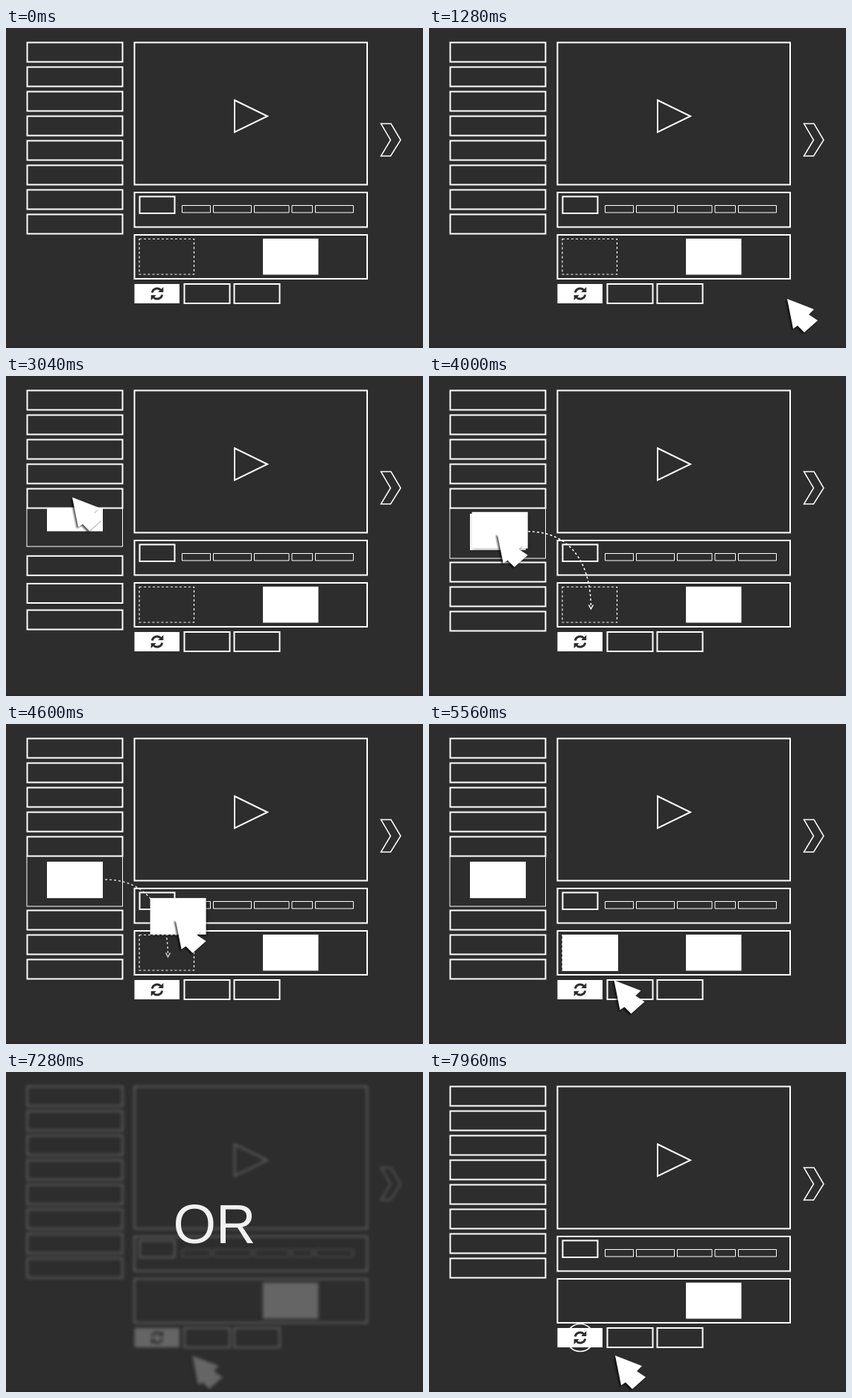
Write an HTML page that moves like this. It is 560 px wide and 430 px high and loops after 8 s.

```html
<!DOCTYPE html>
<html lang="en">
<head>
<meta charset="utf-8">
<title>Drag and drop wireframe</title>
<style>
  html, body { margin: 0; height: 100%; overflow: hidden; background: #2d2d2d; }
  svg { display: block; width: 560px; height: 430px; }
  .line { fill: none; stroke: #fff; stroke-width: 2; }
  .thin { fill: none; stroke: #fff; stroke-width: 1; }
  .dash { stroke-width: 1.2; stroke-dasharray: 3 3; }
  .solid { fill: #fff; }
  #cursor { filter: drop-shadow(-2px 2.5px 1px rgba(0, 0, 0, .65)); }
  #or { font: 74px "Liberation Sans", Arial, sans-serif; fill: #fff; text-anchor: middle; }
</style>
</head>
<body>
<svg viewBox="0 0 560 430">
  <defs>
    <clipPath id="reveal"><rect id="revealBox" x="28" y="178" width="129" height="0"/></clipPath>
  </defs>
  <rect width="560" height="430" fill="#2d2d2d"/>
  <rect y="427" width="560" height="3" fill="#2a2829"/>

  <g id="scene">
    <g id="menu"></g>
    <rect id="panel" class="thin" x="28" y="177.5" width="128.5" height="0"/>
    <g clip-path="url(#reveal)"><rect id="tile" class="solid" x="55" y="185" width="75" height="49"/></g>

    <rect class="line" x="172.5" y="19.5" width="312.5" height="191"/>
    <path class="line" d="M307 97L351 118.5L307 140Z"/>
    <path class="line" style="stroke-width:1.5" d="M503.5 128.5H517L530 150.5L516.5 172H503.5L516.5 150.5Z"/>

    <rect class="line" x="172.5" y="221" width="312.5" height="46.5"/>
    <rect class="line" x="179.5" y="226.5" width="47" height="22.5"/>
    <path class="thin" d="M236.5 238.5h38v9.5h-38zM278.5 238.5h51v9.5h-51zM333.5 238.5h46.5v9.5h-46.5zM384 238.5h27.5v9.5h-27.5zM415.5 238.5h51v9.5h-51z"/>

    <rect class="line" x="172.5" y="278" width="312.5" height="59"/>
    <rect id="slot" class="thin dash" x="179" y="283.5" width="73.5" height="47.5"/>
    <rect class="solid" x="345" y="283" width="74.5" height="48.5"/>

    <rect class="solid" x="172.5" y="344" width="60.5" height="26"/>
    <rect class="line" x="239.5" y="344" width="61" height="26"/>
    <rect class="line" x="306.5" y="344" width="61" height="26"/>
    <g id="icon" transform="translate(203 357)"></g>
    <circle id="ring" class="line" style="stroke-width:1.6" cx="203" cy="357" r="13"/>

    <g id="arrow">
      <path class="thin dash" style="stroke-width:1.5" d="M133 209C185 209 217 245 217.5 311"/>
      <path class="thin" style="stroke-width:1.5" d="M214.5 307.5L217.5 313L220.5 307.5"/>
    </g>
    <g id="drag"><rect class="solid" x="-37.5" y="-24.5" width="75" height="49"/></g>
    <g id="cursor"><path id="pointer" class="solid" d="M0 0L36 14L29 21L41 29L23 45L14 36L8 40Z"/></g>
  </g>
  <text id="or" x="280" y="229.5">OR</text>
</svg>
<script>
const LOOP = 8000;
const $ = id => document.getElementById(id);
const set = (id, attrs) => { for (const k in attrs) $(id).setAttribute(k, attrs[k]); };
const show = (id, on) => { $(id).style.opacity = +on; };

const span = (t, a, b) => Math.min(1, Math.max(0, (t - a) / (b - a)));
const inOut = u => u < .5 ? 2 * u * u : 1 - 2 * (1 - u) ** 2;
const outCubic = u => 1 - (1 - u) ** 3;
const pulse = (t, a, b) => Math.sin(Math.PI * span(t, a, b));
const quad = (a, b, c, u) => a * (1 - u) ** 2 + 2 * b * u * (1 - u) + c * u * u;
const cubic = (b, c, d, u) => 3 * b * u * (1 - u) ** 2 + 3 * c * u * u * (1 - u) + d * u ** 3;

$('menu').innerHTML = Array.from({ length: 8 }, (_, i) =>
  `<rect id="item${i}" class="line" x="28.5" y="${19.5 + 33 * i}" width="128" height="26"/>`).join('');
$('icon').innerHTML = [0, 180].map(a =>
  `<g transform="rotate(${a})"><path d="M-6.7 -1.5A6.8 6.8 0 0 1 5.2 -4.6" fill="none" stroke="#2d2d2d" stroke-width="3"/>
   <path d="M8.3 -9V-2H1.3Z" fill="#2d2d2d"/></g>`).join('');

// Accordion progress for a part that starts opening at the given time
const opened = (t, start) =>
  outCubic(span(t, start, start + 500)) * (1 - inOut(span(t, 6760, 7240)));

function accordion(t) {
  [2795, 2745, 2695].forEach((start, i) =>
    set('item' + (5 + i), { y: 19.5 + 33 * (5 + i) + 66 * opened(t, start) }));
  const h = 67.5 * opened(t, 2850);
  set('panel', { height: h });
  set('revealBox', { height: h });
  set('tile', { y: 185 - 56 * (1 - opened(t, 2925)) });
  const s = 1 - .03 * pulse(t, 2280, 2600);
  set('item4', { transform: `translate(92.5 164.5) scale(${s}) translate(-92.5 -164.5)` });
}

function dragOffset(t) {
  const u = inOut(span(t, 3920, 4880));
  return [cubic(62, 180, 124, u), cubic(-55, -10, 98, u)];
}

function cursorAt(t) {
  if (t < 3320) {
    const u = inOut(span(t, 1380, 2080));
    return [quad(481, 250, 89, u), quad(364, 14, 163, u)];
  }
  if (t < 4880) {
    const [dx, dy] = dragOffset(t);
    return [89 + dx, 163 + 51 * inOut(span(t, 3320, 3720)) + dy];
  }
  const u = inOut(span(t, 5320, 5720));
  return [quad(213, 255, 250, u), quad(312, 312, 381, u)];
}

function popScale(t) {
  const u = span(t, 530, 1280);
  return u < 1 ? 1 - Math.exp(-6 * u) * Math.cos(9 * u) : 1;
}

function render(t) {
  accordion(t);

  const [dx, dy] = dragOffset(t);
  const lift = .45 * span(t, 3920, 4040) * (1 - span(t, 4880, 5080));
  set('drag', { transform: `translate(${92.5 + dx} ${209.5 + dy}) scale(${1 + .05 * pulse(t, 4880, 5280)})` });
  $('drag').style.filter = lift ? `drop-shadow(1px 2px 2px rgba(0,0,0,${lift}))` : 'none';
  show('drag', t < 3920 ? 0 : 1 - span(t, 6760, 7160));
  show('slot', 1 - span(t, 6760, 7160));
  show('arrow', span(t, 3500, 3800) * (1 - span(t, 4560, 4760)));

  const [x, y] = cursorAt(t), pop = popScale(t);
  const press = 1 - .1 * (pulse(t, 2280, 2640) + pulse(t, 4880, 5160));
  set('cursor', { transform: `translate(${x} ${y})` });
  set('pointer', { transform: `translate(21 22) scale(${pop}) translate(-21 -22) scale(${press})` });
  show('cursor', t > 530);

  const dim = inOut(span(t, 6000, 6600)) * (1 - inOut(span(t, 7160, 7760)));
  $('scene').style.opacity = 1 - .79 * dim;
  $('scene').style.filter = dim ? `blur(${2.2 * dim}px)` : 'none';
  show('or', inOut(span(t, 6080, 6460)) * (1 - inOut(span(t, 7200, 7640))));

  set('ring', { r: 13 + 5.5 * span(t, 7880, 7960) });
  show('ring', t > 7880);
}

function tick() {
  render(performance.now() % LOOP);
  requestAnimationFrame(tick);
}
tick();
</script>
</body>
</html>
```
